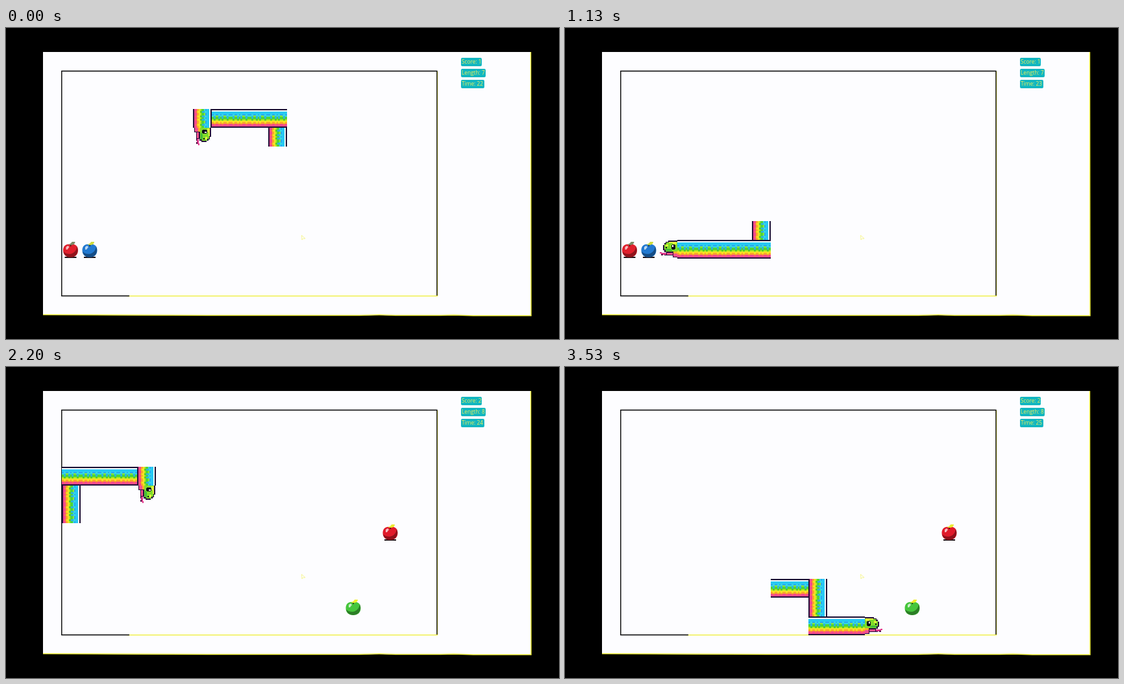
These frames come from a looping animation (852 by 480 pixels, 3590 ms). An HTML page:

```html
<!DOCTYPE html>
<html lang="en">
<head>
<meta charset="utf-8">
<title>Rainbow snake</title>
<style>
html, body { margin: 0; width: 100%; height: 100%; overflow: hidden; background: #000; }
svg { display: block; width: 852px; height: 480px; }
text { font: 8.3px "Open Sans", "Noto Sans", sans-serif; fill: #eef05a; }
</style>
</head>
<body>
<svg viewBox="0 0 852 480">
  <defs>
    <g id="body" shape-rendering="crispEdges"></g>
    <g id="head" shape-rendering="crispEdges">
      <path fill="#24103a" d="M0 1H14V3H18V5H20V8H22V16H20V19H17V21H20V24H7V27H0Z"/>
      <path fill="#7fdc2a" d="M0 3H13V4H17V7H20V15H18V18H0Z"/>
      <path fill="#e2f23a" d="M1 3H13V5H7V7H1ZM14 7H18V10H14Z"/>
      <path fill="#3fbb3a" d="M10 14H18V17H8V15H10Z"/>
      <path fill="#ffb02a" d="M0 18H6V21H0Z"/>
      <path fill="#f4508e" d="M0 21H6V26H0ZM7 20H16V23H7Z"/>
      <path fill="#e0368a" d="M17 20H24V19H27V21H25V23H17Z"/>
      <path fill="#55184a" d="M22 22H25V24H22Z"/>
      <path fill="#0c0a18" d="M4 7H8V8H9V14H8V15H4V14H3V8H4ZM16 11H18V13H16Z"/>
      <path fill="#fff" d="M6 8H8V11H6Z"/>
    </g>
    <g id="apple">
      <path fill="currentColor" d="M0 -8.500C6 -11 11.500 -7 11.500 0C11.500 7 7 11 0 11C-7 11 -11.500 7 -11.500 0C-11.500 -7 -6 -11 0 -8.500Z"/>
      <path fill="#000" opacity=".36" d="M10 -6C13.500 2 9 11 0 11C-6 11 -10 7 -11.200 2C-6 8 8 8 10 -6Z"/>
      <path fill="#fff" opacity=".7" d="M-7 -5L-4 -7L-2 -5L-5 -1H-7Z"/>
      <path stroke="#2a1a12" stroke-width="1.500" fill="none" d="M0 -6Q0 -9 2 -11"/>
    </g>
  </defs>

  <path fill="#fdfdff" d="M57 37H808L809 444H690L680 443.500L600 444L575 443L545 444H310L57 442.500Z"/>
  <path fill="none" stroke="#f2f23c" stroke-width="1.400" d="M57 442.500L310 443.500H545L575 442.600L600 443.500H670L690 443L720 444H809L808.500 37"/>
  <path fill="none" stroke="#eeee30" stroke-width="1.200" d="M186 413.700H664.700V67"/>
  <path fill="none" stroke="#000" stroke-width="1.400" d="M190 413.500H85.800V66.500H664V413"/>
  <path fill="none" stroke="#f4f47a" stroke-width=".8" d="M455.500 320L461 325H457.500L456 327Z"/>

  <g id="labels"></g>
  <g id="fruit"></g>
  <g id="snake"></g>
</svg>
<script>
const LOOP = 3590, FRAME = 200 / 3, CELL = 28.9, LEFT = 86, TOP = 67;
const EAT_MOVE = 12, EAT_TIME = 1150, SLOW = 100, FAST = 84, MAX_MOVES = 40;
const STEP = { U: [0, -1], D: [0, 1], L: [-1, 0], R: [1, 0] };
const FLIP = "translate(29 0) scale(-1 1)", TURN = "rotate(90 14.5 14.5)";
// The upward head is a slightly smaller sprite
const POSE = { R: "", L: FLIP, D: TURN, U: "scale(.84 .88)" + TURN + FLIP };

const $ = id => document.getElementById(id);
function add(parent, tag, attrs) {
  const el = document.createElementNS("http://www.w3.org/2000/svg", tag);
  for (const k in attrs) el.setAttribute(k, attrs[k]);
  return parent.appendChild(el);
}

// Rainbow segment: bands from top to bottom, crossed by scales
const bands = [
  [0, "#1c0f33"], [2, "#f1fcff"], [4, "#27c9f5"], [8, "#2aa6f2"], [10, "#35dbe0"],
  [12, "#4fd535"], [16, "#b6e81f"], [18, "#f4e322"], [20, "#fba42a"], [23, "#f4488e"], [27, "#24103a"]
];
bands.forEach(([y, fill], i) => {
  const end = i + 1 < bands.length ? bands[i + 1][0] : 29;
  add($("body"), "rect", { x: 0, y, width: 29, height: end - y, fill });
});
const scales = [[8, 3, "#35dbe0"], [11, 4, "#2fb4d8"], [15, 3, "#52cc30"], [20, 2, "#f4e322"], [23, 2, "#fb6f5a"]];
for (const [y, height, fill] of scales)
  for (const x of [3, 10, 15, 23]) add($("body"), "rect", { x, y, width: 3, height, fill });
for (const x of [6, 18]) add($("body"), "rect", { x, y: 10, width: 4, height: 2, fill: "#8ee83a" });

// Cells visited, in order; the head starts at index 6
const route = "ULLLLD" + "DDDDDD" + "LLLLLLL" + "UUUUUU" + "RRRR" + "DDDDDD" + "RRRRRR" + "DD" + "RRR";
const cells = [[11, 3]];
for (const d of route) {
  const [x, y] = cells[cells.length - 1];
  cells.push([x + STEP[d][0], y + STEP[d][1]]);
}

function fruit(x, y, color, leaf, shadow) {
  const g = add($("fruit"), "g", { transform: `translate(${x} ${y})`, color });
  if (shadow) add(g, "path", { d: "M-9 11H9", stroke: "#1c1216", "stroke-width": 2 });
  add(g, "use", { href: "#apple" });
  add(g, "path", { d: "M-4 -9Q1 -10 2 -13L7 -13Q7 -8 0 -8Z", fill: leaf });
  return g;
}
const before = [fruit(99.5, 343, "#e0202c", "#7d8a66", true), fruit(129, 343, "#2279d0", "#cfdc3c", true)];
const after = [fruit(592, 256, "#e01a2a", "#ecec30", true), fruit(535, 372, "#46c63c", "#f0f02e", false)];

const labels = [32, 38, 36].map((width, i) => {
  const y = 46 + 17 * i;
  add($("labels"), "rect", { x: 701, y, width, height: 13, rx: 2, fill: "#12b6c0" });
  return add($("labels"), "text", { x: 702, y: y + 9 });
});

const parts = Array.from({ length: 8 }, (_, i) => add($("snake"), "use", { href: i < 7 ? "#body" : "#head" }));

function movesAt(t) {
  const n = t < EAT_TIME ? Math.floor((t + 50) / SLOW) : EAT_MOVE + Math.floor((t - EAT_TIME) / FAST);
  return Math.min(n, MAX_MOVES);
}

function place(el, index, pose) {
  const [x, y] = cells[index];
  const px = Math.round(LEFT + x * CELL), py = Math.round(TOP + y * CELL);
  el.setAttribute("transform", `translate(${px} ${py}) ${pose}`);
}

function draw(now) {
  const t = Math.floor((now % LOOP + 3.4) / FRAME) * FRAME;
  const moves = movesAt(t), eaten = moves >= EAT_MOVE, head = moves + 6;
  const length = eaten ? 8 : 7;

  parts.forEach((el, i) => {
    const back = 7 - i, index = head - back;
    el.style.display = back < length ? "" : "none";
    if (back >= length) return;
    if (back === 0) place(el, index, POSE[route[index - 1]]);
    else place(el, index, "UD".includes(route[index]) ? TURN : "");
  });

  for (const el of before) el.style.display = eaten ? "none" : "";
  for (const el of after) el.style.display = eaten ? "" : "none";
  labels[0].textContent = "Score: " + (eaten ? 2 : 1);
  labels[1].textContent = "Length: " + length;
  labels[2].textContent = "Time: " + (22 + Math.floor((t + 100) / 1000));
}

function tick() {
  draw(performance.now());
  requestAnimationFrame(tick);
}
tick();
</script>
</body>
</html>
```
